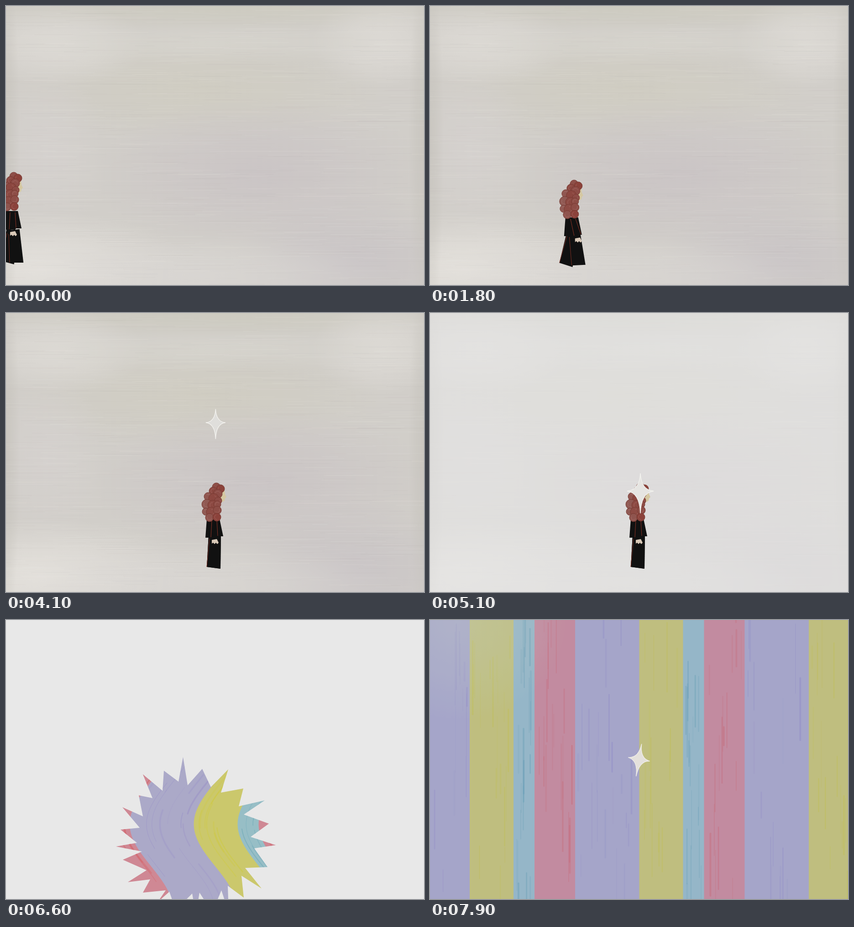
An HTML page with a canvas for the animation above (8 s loop, 916 px wide and 611 px high).

```html
<!DOCTYPE html>
<html lang="en">
<head>
<meta charset="utf-8">
<title>Falling star</title>
<style>
  html, body { margin: 0; width: 100%; height: 100%; overflow: hidden; background: #e8e8e8; }
  canvas { display: block; }
</style>
</head>
<body>
<canvas id="stage" width="916" height="611"></canvas>
<script>
const W = 916, H = 611, LOOP = 8000, STEP = 100, TAU = Math.PI * 2;
const ctx = document.getElementById('stage').getContext('2d');

const clamp = v => Math.max(0, Math.min(1, v));
const ramp = (t, a, b) => clamp((t - a) / (b - a));
const mix = (a, b, k) => a + (b - a) * k;

function randomizer(seed) {
  return () => {
    seed = (seed * 1664525 + 1013904223) % 4294967296;
    return seed / 4294967296;
  };
}

function poly(g, pts, fill) {
  g.beginPath();
  for (let i = 0; i < pts.length; i += 2) g.lineTo(pts[i], pts[i + 1]);
  g.closePath();
  if (fill) { g.fillStyle = fill; g.fill(); }
}

function line(g, x1, y1, x2, y2, color, width) {
  g.strokeStyle = color;
  g.lineWidth = width;
  g.beginPath();
  g.moveTo(x1, y1);
  g.lineTo(x2, y2);
  g.stroke();
}

// Soft elliptical patch of paint
function glow(g, x, y, rx, ry, rgb, alpha) {
  g.save();
  g.translate(x, y);
  g.scale(rx, ry);
  const grad = g.createRadialGradient(0, 0, 0, 0, 0, 1);
  grad.addColorStop(0, `rgba(${rgb},${alpha})`);
  grad.addColorStop(0.5, `rgba(${rgb},${alpha * 0.6})`);
  grad.addColorStop(1, `rgba(${rgb},0)`);
  g.fillStyle = grad;
  g.fillRect(-1, -1, 2, 2);
  g.restore();
}

function paintPaper() {
  const c = document.createElement('canvas');
  c.width = W;
  c.height = H;
  const g = c.getContext('2d'), rnd = randomizer(7);
  g.fillStyle = '#d1cec9';
  g.fillRect(0, 0, W, H);
  glow(g, 460, 0, 620, 60, '204,202,190', 0.8);
  glow(g, 420, 180, 420, 120, '207,204,192', 0.8);
  glow(g, 560, 370, 380, 170, '202,196,197', 0.9);
  glow(g, 760, 560, 260, 150, '201,196,198', 0.9);
  glow(g, 110, 85, 200, 90, '222,219,214', 0.9);
  glow(g, 820, 80, 150, 100, '222,219,214', 0.9);
  glow(g, 450, 82, 440, 45, '215,213,206', 0.7);
  glow(g, 90, 320, 130, 190, '214,210,208', 0.7);
  glow(g, 80, 580, 330, 130, '228,225,220', 1);
  glow(g, 420, 590, 420, 90, '218,215,212', 0.8);
  glow(g, 0, 300, 30, 420, '196,193,186', 0.6);
  glow(g, 916, 300, 34, 420, '196,193,186', 0.6);
  for (let i = 0; i < 900; i++) {
    const x = rnd() * W - 60, y = rnd() * H, len = 30 + rnd() * 150;
    const tone = rnd() < 0.55 ? '240,238,232' : '176,170,168';
    line(g, x, y, x + len, y, `rgba(${tone},${0.04 + rnd() * 0.1})`, 1);
  }
  return c;
}
const paper = paintPaper();

function star(x, y, w, up, down, turn, fill, edge) {
  const k = 0.06;
  ctx.save();
  ctx.translate(x, y);
  ctx.rotate(turn);
  ctx.beginPath();
  ctx.moveTo(0, -up);
  ctx.quadraticCurveTo(w * k, -up * k, w, 0);
  ctx.quadraticCurveTo(w * k, down * k, 0, down);
  ctx.quadraticCurveTo(-w * k, down * k, -w, 0);
  ctx.quadraticCurveTo(-w * k, -up * k, 0, -up);
  ctx.closePath();
  ctx.fillStyle = fill;
  ctx.fill();
  ctx.strokeStyle = edge;
  ctx.lineWidth = 1.3;
  ctx.stroke();
  ctx.restore();
}

// Curls: x, y, radius
const curls = [
  [457, 383, 9], [466, 387, 9], [450, 392, 9], [460, 398, 10], [439, 404, 9], [451, 408, 11],
  [461, 413, 8], [436, 421, 11], [449, 423, 11], [459, 421, 8], [434, 437, 8], [446, 438, 11],
  [459, 434, 9], [442, 450, 9], [458, 449, 9]
];
const SKIN = '#d5c8a2', HAND = '#d9c9b8', CLOTH = '#111', SEAM = '#8c3326';

function hair() {
  curls.forEach(([x, y, r], i) => {
    const red = clamp((x - 430) / 36) * 0.7 + (i % 3) * 0.15;
    ctx.fillStyle = `rgb(${mix(147, 137, red)},${mix(99, 60, red)},${mix(94, 52, red)})`;
    ctx.strokeStyle = '#74372f';
    ctx.lineWidth = 0.9;
    ctx.beginPath();
    ctx.arc(x, y, r, 0, TAU);
    ctx.fill();
    ctx.stroke();
    ctx.strokeStyle = 'rgba(190,140,134,.45)';
    ctx.beginPath();
    ctx.arc(x, y, r * 0.55, i, i + 3);
    ctx.stroke();
  });
}

function leg(angle) {
  ctx.save();
  ctx.translate(454, 480);
  ctx.rotate(angle);
  poly(ctx, [-12, 6, 15, 6, 14, 80, -16, 76], CLOTH);
  line(ctx, -10, 14, -16, 76, SEAM, 0.8);
  ctx.restore();
}

function girl(t) {
  const walking = t < 2650;
  const c = Math.cos(TAU * t / 400);
  const swing = walking ? 0.22 * Math.sin(TAU * (t + 80) / 800) : 0;
  const arm = walking ? 10 * Math.sin(TAU * t / 800) : 0;
  const look = ramp(t, 2800, 3500);
  const at = (x, y, draw) => {
    ctx.save();
    ctx.translate(x, y);
    draw();
    ctx.restore();
  };

  ctx.save();
  ctx.translate(Math.min(0, -440 + 0.166 * t) + 2 * look, 0);
  at(0, walking ? 7.5 - 3 * c : 0, () => {
    leg(swing);
    leg(-swing);
  });
  at(0, walking ? 4 - 7 * c : -look, () => {
    poly(ctx, [449 + arm, 498, 460 + arm, 496, 464 + arm, 504, 461 + arm, 507, 458 + arm, 504,
      455 + arm, 507, 452 + arm, 504, 449 + arm, 506], HAND);
    poly(ctx, [438, 452, 466, 452, 474, 490, 462, 490, 460, 493, 435, 493], CLOTH);
    line(ctx, 449, 455, 447 + arm, 492, SEAM, 1);
    line(ctx, 460, 455, 462 + arm, 489, SEAM, 1);
  });
  at(2 * look, walking ? -1.5 - 8.5 * c : -2 * look, () => {
    at(2 * look, -3 * look, () =>
      poly(ctx, [464, 392, 473, 394, 474, 402, 477, 408, 474, 411, 473, 416, 468, 419, 460, 416], SKIN));
    hair();
  });
  ctx.restore();
}

function walkScene(t) {
  ctx.drawImage(paper, 0, 0);
  const white = ramp(t, 4500, 5400);
  ctx.fillStyle = `rgba(232,232,232,${white})`;
  ctx.fillRect(0, 0, W, H);

  if (t < 5800) {
    const top = t < 5200 ? 0 : t < 5400 ? mix(360, 399, ramp(t, 5200, 5400)) : mix(399, 561, ramp(t, 5400, 5800));
    ctx.save();
    ctx.beginPath();
    ctx.rect(0, top, W, H);
    ctx.clip();
    ctx.globalAlpha = 1 - ramp(t, 5200, 5850);
    girl(t);
    ctx.restore();
  }

  if (t >= 2300 && t < 5700) {
    const k = (t - 2700) / 2400;
    const body = Math.round(mix(212, 230, clamp(k)));
    ctx.globalAlpha = 1 - ramp(t, 5300, 5700);
    star(mix(457, 461, clamp(k)), 30 + 360 * k, mix(11, 29, k), mix(17, 39, k), mix(18, 49, k), 0,
      `rgb(${body},${body - 1},${body - 4})`, '#f4f3ef');
    ctx.globalAlpha = 1;
  }
}

const PERIOD = 371.5;
// Offset, width, fill, streak colour
const bands = [
  [0, 96, '#cbc86c', '206,200,62'],
  [96, 46, '#97bec6', '104,164,180'],
  [142, 89, '#cf8894', '212,98,104'],
  [231, 140.5, '#aba9c8', '150,142,198']
];

const streaks = (() => {
  const rnd = randomizer(41);
  return Array.from({ length: 300 }, () => {
    const band = bands[Math.floor(rnd() * 4)];
    return {
      x: 87 + PERIOD * (Math.floor(rnd() * 4) - 1) + band[0] + 6 + rnd() * (band[1] - 12),
      y: rnd() * 640 - 60,
      len: 35 + rnd() * 130,
      width: 1 + rnd() * 3,
      color: `rgba(${band[3]},${0.15 + rnd() * 0.4})`
    };
  });
})();

function stripes(t) {
  const amp = 47 * (1 - Math.pow(ramp(t, 6600, 7800), 1.5));
  const wave = y => -amp * Math.cos(TAU * (y - 447) / 370);

  for (let n = -1; n < 3; n++) {
    for (const [off, width, fill] of bands) {
      const x = 87 + n * PERIOD + off;
      ctx.beginPath();
      for (let y = -8; y <= 624; y += 8) ctx.lineTo(x + wave(y), y);
      for (let y = 624; y >= -8; y -= 8) ctx.lineTo(x + width + 1 + wave(y), y);
      ctx.fillStyle = fill;
      ctx.fill();
    }
  }
  ctx.lineCap = 'round';
  for (const s of streaks) {
    ctx.strokeStyle = s.color;
    ctx.lineWidth = s.width;
    ctx.beginPath();
    for (let y = s.y; y <= s.y + s.len; y += 8) ctx.lineTo(s.x + wave(y), y);
    ctx.stroke();
  }
  ctx.lineCap = 'butt';
  glow(ctx, 60, 0, 240, 220, '214,222,200', 0.3 * ramp(t, 6700, 7200));
  ctx.fillStyle = `rgba(140,150,205,${0.2 * ramp(t, 7300, 7800)})`;
  ctx.fillRect(0, 0, W, H);
}

// Tips and valleys, clockwise from the top
const burst = [
  388, 300, 398, 362, 430, 326, 449, 366, 487, 327, 471, 378, 520, 369, 510, 408, 567, 395, 521, 426,
  576, 446, 536, 475, 591, 493, 544, 500, 573, 541, 524, 543, 560, 588, 516, 560, 521, 608, 486, 582,
  488, 640, 472, 592, 452, 640, 424, 597, 416, 645, 408, 599, 372, 635, 358, 595, 332, 618, 350, 592,
  300, 597, 316, 568, 267, 574, 308, 548, 256, 525, 298, 507, 241, 496, 287, 488, 251, 459, 293, 455,
  255, 410, 300, 430, 291, 384, 321, 390, 300, 338, 343, 374, 346, 330, 378, 354
];

function burstScene(t) {
  const size = Math.pow((t - 5900) / 700, 4.7);
  ctx.fillStyle = '#e8e8e8';
  ctx.fillRect(0, 0, W, H);
  ctx.save();
  if (t < 7000) {
    poly(ctx, burst.map((v, i) => {
      const mid = i % 2 ? 468 : 416;
      return mid + (v - mid) * size;
    }));
    ctx.clip();
  }
  stripes(t);
  ctx.restore();

  if (t >= 7700) {
    const k = mix(0.4, 1, ramp(t, 7700, 7900));
    star(458, 305, 24 * k, 34 * k, 38 * k, 0.17, '#e4e1dc', '#efede8');
  }
}

const start = performance.now();
function frame() {
  const t = Math.floor(((performance.now() - start) % LOOP) / STEP) * STEP;
  if (t < 6000) walkScene(t);
  else burstScene(t);
  requestAnimationFrame(frame);
}
frame();
</script>
</body>
</html>
```
